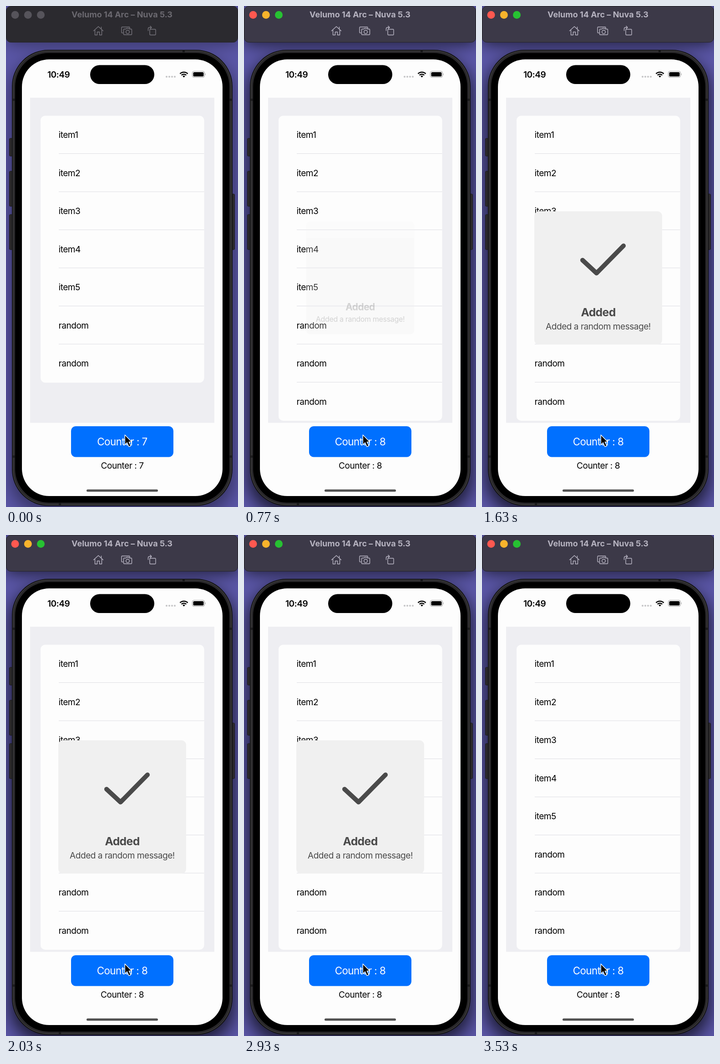
These frames come from a looping animation (510 by 1098 pixels, 3.56 s). An HTML page:

```html
<!DOCTYPE html>
<html lang="en">
<head>
<meta charset="utf-8">
<title>Toast demo</title>
<style>
  html, body { margin: 0; width: 100%; height: 100%; overflow: hidden; background: #5a56a6; }
  svg { display: block; width: 510px; height: 1098px; }
  text { font-family: Inter, "Open Sans", sans-serif; font-size: 19.07px; letter-spacing: -.025em; }
  .mid { text-anchor: middle; }
  .bar { fill: #2b2a2f; }
  .title { fill: #6b6970; font-size: 18px; font-weight: 700; letter-spacing: 0; }
  .icons { fill: none; stroke: #77757d; stroke-width: 1.4; stroke-linejoin: round; stroke-linecap: round; }
  .lights { fill: #56545b; }
  .shade { opacity: .38; }
  .active .bar { fill: #3c3948; }
  .active .title { fill: #b6b3c0; }
  .active .icons { stroke: #bab7c5; }
  .active .shade { opacity: .66; }
  .active .red { fill: #ff5850; }
  .active .amber { fill: #f8b32c; }
  .active .green { fill: #27c232; }
</style>
</head>
<body>
<svg id="stage" viewBox="0 0 510 1098">
  <defs>
    <filter id="soft" x="-20%" y="-20%" width="140%" height="140%"><feGaussianBlur stdDeviation="17"/></filter>
  </defs>
  <rect width="510" height="1098" fill="#5a56a6"/>
  <g class="shade" filter="url(#soft)">
    <rect x="8" y="112" width="494" height="1000" rx="78"/>
    <rect y="8" width="510" height="76" rx="10"/>
  </g>

  <!-- window bar -->
  <rect class="bar" x=".5" y=".5" width="509" height="79" rx="10" stroke="#252329"/>
  <g class="lights">
    <circle class="red" cx="20" cy="19.5" r="8.5"/>
    <circle class="amber" cx="48.3" cy="19.5" r="8.5"/>
    <circle class="green" cx="76.5" cy="19.5" r="8.5"/>
  </g>
  <text class="title mid" x="255" y="25">Velumo 14 Arc – Nuva 5.3</text>
  <g class="icons">
    <path d="M192.500 54.500L203 45l10.500 9.500M195.500 53v10.500h5V57h5v6.500h5V53M209.500 50v-4"/>
    <path d="M257 59h-1.500q-1.500 0-1.500-1.500v-10q0-1.500 1.500-1.500h15q1.500 0 1.500 1.500V49"/>
    <path d="M260 50.500h3.500l1.500-1.500h5l1.500 1.500h3.500q1.500 0 1.500 1.500v9.500q0 1.500-1.500 1.500h-15q-1.500 0-1.500-1.500V52q0-1.500 1.500-1.500z"/>
    <circle cx="267.500" cy="56.800" r="3.800"/>
    <rect x="316" y="51" width="13" height="12.500" rx="1.500"/>
    <path d="M312.500 54v-4q0-3 3-3h4.500M317 44l3 3-3 3"/>
  </g>

  <!-- phone -->
  <g fill="#2b292b" stroke="#1b1a1c">
    <rect x="7.500" y="290" width="8" height="39" rx="2"/>
    <rect x="7.500" y="362" width="8" height="77" rx="2"/>
    <rect x="7.500" y="457" width="8" height="77" rx="2"/>
    <rect x="495" y="412" width="7.500" height="122" rx="2"/>
  </g>
  <rect x="14" y="97" width="483" height="997.500" rx="79" fill="#29282a" stroke="#121213" stroke-width="2"/>
  <rect x="15.500" y="98.500" width="480" height="994.500" rx="77.500" fill="none" stroke="#4c4a4b"/>
  <path d="M388 100h5M116 1091.500h5M17.500 203v5M493.500 203v5M17.500 985v5M493.500 985v5" stroke="#171718" stroke-width="4"/>
  <rect x="20" y="103" width="471" height="985.500" rx="74"/>
  <rect x="35" y="117" width="441" height="957" rx="60" fill="#fdfdfd"/>

  <!-- status bar -->
  <text class="mid" x="115.500" y="156.500" font-weight="600">10:49</text>
  <rect x="185" y="129.500" width="141" height="41.500" rx="20.750"/>
  <g fill="#c6c6c8">
    <circle cx="353" cy="155" r="2.100"/><circle cx="359" cy="155" r="2.100"/>
    <circle cx="365" cy="155" r="2.100"/><circle cx="371" cy="155" r="2.100"/>
  </g>
  <g fill="none" stroke="#000" stroke-width="2.600">
    <path d="M382.500 148.500a12 12 0 0 1 17 0M385.700 151.700a7.500 7.500 0 0 1 10.600 0"/>
    <path d="M388.300 153.700a4 4 0 0 1 5.400 0L391 156.800z" fill="#000" stroke="none"/>
  </g>
  <rect x="409.500" y="143" width="27" height="13.500" rx="4.200" fill="none" stroke="#a3a3a3" stroke-width="1.200"/>
  <rect x="411.500" y="145" width="23" height="9.500" rx="2.600"/>
  <path d="M438 147.500q2 2.200 0 4.500z" fill="#a3a3a3"/>

  <!-- list -->
  <rect x="53" y="201" width="405" height="712.500" fill="#eeeef2"/>
  <rect id="card" x="76" y="240.500" width="359.500" rx="10" fill="#fdfdfd"/>
  <g id="rows"></g>

  <!-- button and footer -->
  <rect x="143" y="921" width="225" height="67.500" rx="10" fill="#0070ff"/>
  <text class="mid count" x="255.500" y="962.500" style="font-size:22.4px" fill="#fff"></text>
  <text class="mid count" x="255.500" y="1013.500"></text>
  <rect x="177" y="1059.500" width="157" height="5" rx="2.500" fill="#505050"/>

  <!-- toast -->
  <g id="toast" fill="#4a4a4a">
    <rect x="115" y="450" width="281" height="292" rx="10" fill="#f0f0f0"/>
    <path id="check" d="M221 557L251.800 585.500L311 525.500" pathLength="1" fill="none" stroke="#4a4a4a" stroke-width="10" stroke-linecap="round" stroke-linejoin="round"/>
    <text class="mid" x="255.500" y="680" style="font-size:24.7px" font-weight="700">Added</text>
    <text class="mid" x="255.500" y="709">Added a random message!</text>
  </g>

  <path d="M261.300 940v21.500l4.800-4.600 4 8.900 4.200-1.800-4-8.600h6.200z" fill="#000" stroke="#fff" stroke-width="1.400" stroke-linejoin="round"/>
</svg>
<script>
  const LOOP = 3560;
  const FOCUS = 350, ADD = 530, SHOW = 695, DRAW = 883, HIDE = 2965;
  const ROW = 83.5, TOP = 240.5;
  const $ = id => document.getElementById(id);
  const stage = $('stage'), card = $('card'), rows = $('rows'), toast = $('toast'), check = $('check');
  const counts = document.querySelectorAll('.count');
  let shown = 0;

  // Damped spring from 0 to 1, ms after its start; response in seconds.
  function spring(ms, response) {
    if (ms <= 0) return 0;
    const zeta = 0.825, w = 2 * Math.PI / response, t = ms / 1000;
    const root = Math.sqrt(1 - zeta * zeta), a = w * root * t;
    return 1 - Math.exp(-zeta * w * t) * (Math.cos(a) + zeta / root * Math.sin(a));
  }

  function setRows(n) {
    if (n === shown) return;
    shown = n;
    card.setAttribute('height', n * ROW + 0.5);
    let html = '';
    for (let i = 0; i < n; i++) {
      const y = TOP + i * ROW;
      html += `<text x="115.5" y="${y + 48.5}">${i < 5 ? 'item' + (i + 1) : 'random'}</text>`;
      if (i < n - 1) html += `<path d="M116 ${y + ROW - 0.5}H435.5" stroke="#dddde3"/>`;
    }
    rows.innerHTML = html;
    counts.forEach(c => c.textContent = 'Counter : ' + n);
  }

  function draw(t) {
    stage.classList.toggle('active', t >= FOCUS);
    setRows(t < ADD ? 7 : 8);

    const p = t < HIDE ? spring(t - SHOW, 0.55) : 1 - spring(t - HIDE, 0.55);
    const s = 0.8 + 0.2 * p;
    toast.setAttribute('opacity', Math.min(1, Math.max(0, p)));
    toast.setAttribute('transform', `translate(255.5 596) scale(${s}) translate(-255.5 -596)`);

    const c = Math.min(1, spring(t - DRAW, 0.733));
    check.setAttribute('stroke-dasharray', `${c} 2`);
    check.setAttribute('visibility', c > 0 ? 'visible' : 'hidden');
  }

  const start = performance.now();
  function tick() {
    draw((performance.now() - start) % LOOP);
    requestAnimationFrame(tick);
  }
  tick();
</script>
</body>
</html>
```
